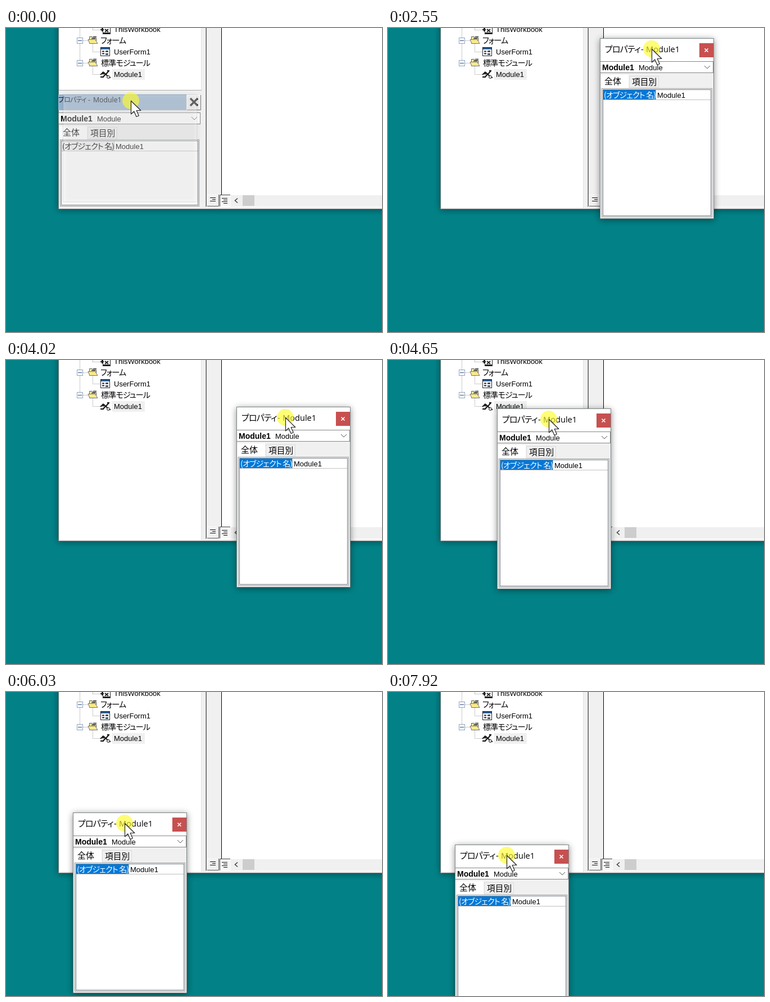
Animation of 669x540 px, one loop 8 s. Source, as an HTML page:

```html
<!DOCTYPE html>
<html lang="ja">
<head>
<meta charset="utf-8">
<style>
html, body { margin: 0; width: 100%; height: 100%; overflow: hidden; background: #028287; }
svg { display: block; width: 669px; height: 540px; }
rect, line { shape-rendering: crispEdges; }
text { font: 13px "Liberation Sans", sans-serif; white-space: pre; }
.b { font-weight: bold; font-size: 14px; }
.j { font: 14px "Noto Sans CJK JP", "Noto Sans CJK", sans-serif; font-feature-settings: "palt"; letter-spacing: -.8px; }
.k { font: 15px "Noto Sans CJK JP", "Noto Sans CJK", sans-serif; }
.s { font: 12.3px "Open Sans", sans-serif; }
.t { font: 14.6px "Open Sans", sans-serif; }
.shade { filter: drop-shadow(0 2px 6px rgba(0,0,0,.45)); }
#ghost { filter: drop-shadow(0 1px 4px rgba(0,0,0,.3)); }
</style>
</head>
<body>
<svg id="stage" viewBox="0 0 669 540"></svg>
<script>
const rect = (x, y, w, h, fill, stroke) => stroke
  ? `<rect x="${x + .5}" y="${y + .5}" width="${w - 1}" height="${h - 1}" fill="${fill}" stroke="${stroke}"/>`
  : `<rect x="${x}" y="${y}" width="${w}" height="${h}" fill="${fill}"/>`;
const path = (d, stroke, width = 1, fill = 'none', extra = '') =>
  `<path d="${d}" fill="${fill}" stroke="${stroke}" stroke-width="${width}" ${extra}/>`;
const text = (x, y, s, cls = '', fill = '#000', extra = '') =>
  `<text x="${x}" y="${y}" class="${cls}" fill="${fill}" ${extra}>${s}</text>`;
const group = (id, content, extra = '') => `<g id="${id}" ${extra}>${content}</g>`;

// Combo box, tabs and property list, shared by the docked and the floating panel
function panelBody(w, listHeight, selected) {
  const cx = w - 12;
  return rect(0, 41, w - 1, 21, '#fff', '#868686')
    + text(4, 57, 'Module1', 'b') + text(69, 57, 'Module')
    + path(`M${cx - 5} 49l5 5 5-5`, '#555')
    + rect(1, 65, 50, 24, '#fff') + rect(52, 67, 53, 21, '#f0f0f0', '#dcdcdc')
    + text(8, 82, '全体', 'k') + text(57, 83, '項目別', 'k', '#000', 'style="font-size:14.7px"')
    + rect(3, 89, w - 6, listHeight, '#fff', '#9a9a9a')
    + rect(5, 91, w - 10, listHeight - 4, '#fff', '#777f88')
    + rect(6, 92, 93, 17, selected ? '#0078d7' : '#f0f0f0')
    + text(7, 106, '(オブジェクト 名)', 'j', selected ? '#fff' : '#000')
    + text(102, 106, 'Module1')
    + rect(6, 109, w - 12, 1, '#c0c0c0') + rect(99, 92, 1, 17, '#c0c0c0');
}

const folder = y => path(`M148.500 ${y + 3.5}v-2h5l1 2h6v10h-12z`, '#555', 1, '#fff3a0')
  + path(`M146 ${y + 6.5}h13l4 7h-14z`, '#777', 1, '#fbe98a')
  + path(`M152 ${y + 4.5}h7M155 ${y + 1.5}h6`, '#333', 1.5);

const expander = y => rect(126, y, 11, 11, '#fff', '#93a6bd') + rect(128, y + 5, 7, 1, '#2a4f8f');

const tree = path('M131.5 0V62M137 22.5h9M137 62.5h9M154.5 0V3M154.5 28V42.5M154 3.5h14M154 42.5h14M154.5 68V82.5M154 82.5h14',
    '#999', 1, 'none', 'stroke-dasharray="1 1"')
  + expander(17) + expander(57) + folder(14) + folder(54)
  + rect(172, -6, 14, 16, '#fff', '#222') + rect(172, 8, 14, 3, '#222')
  + path('M168 3h6M171 0v6M176 2l6 5m0-5l-6 5', '#222', 2)
  + rect(168, 34, 17, 16, '#fff', '#223') + rect(169, 35, 15, 3, '#2c5a8c')
  + path('M171 41.5h4M171 45.5h4', '#223', 2) + rect(177, 40, 5, 3, '#456') + rect(177, 45, 5, 3, '#456')
  + path('M168 83l5-4 5 3 5-6M172 88l5-6 6 5M168 87h4M180 76h4M181 88h5', '#111', 2)
  + '<circle cx="173" cy="80" r="2.5" fill="#222"/><circle cx="182" cy="87" r="2.5" fill="#ddd" stroke="#222"/>'
  + rect(189, 73, 58, 19, '#f0f0f0')
  + text(192, 7, 'ThisWorkbook') + text(168, 27, 'フォーム', 'j', '#000', 'style="letter-spacing:-1px"')
  + text(192, 47, 'UserForm1') + text(169, 67, '標準モジュール', 'j') + text(192, 87, 'Module1');

const editor = rect(347, 0, 1, 320, '#e2e2e2')
  + rect(355, 0, 1, 318, '#a0a0a0') + rect(356, 0, 1, 318, '#606060')
  + rect(384, 0, 285, 297, '#fff') + rect(383, 0, 1, 297, '#000')
  + rect(358, 296, 21, 21, '#f0f0f0') + path('M378.5 296v20.5H358', '#555')
  + path('M358.5 316V296.5H378', '#fff')
  + path('M363 301.5h10M367 304.5h6M363 307.5h10', '#111')
  + rect(380, 296, 19, 21, '#f4f4f4') + path('M380.5 317V296.5H399', '#444') + path('M399 297v19.5H381', '#fff')
  + path('M384 302.5h10M387 305.5h7M384 308.5h10M387 311.5h7', '#111')
  + path('M412 302.5l-4.5 4 4.5 4', '#444', 1.6)
  + rect(421, 297, 21, 19, '#cdcdcd')
  + rect(356, 317, 313, 1, '#fff');

const docked = rect(94, 110, 254, 210, '#f0f0f0') + rect(94, 110, 254, 1, '#aaa')
  + rect(93, 118, 254, 28, '#99b4d1')
  + text(93, 132, 'プロパティ', 'j', '#111', 'style="font-size:12px"')
  + text(146, 132, '-', 's', '#111') + text(155, 132, 'Module1', 's', '#111')
  + rect(321, 118, 26, 28, '#f0f0f0') + path('M346.5 119v26.5H322', '#777') + path('M322.5 145V119.5H346', '#fff')
  + path('M328 125l13 13m0-13l-13 13', '#222', 3.4)
  + `<g transform="translate(93 109)">${panelBody(254, 119, false)}</g>`;

const floating = '<g class="shade">' + rect(0, 0, 203, 321, '#f0f0f0') + '</g>'
  + rect(0, 0, 203, 321, '#f0f0f0', '#7d8587') + rect(1, 1, 201, 40, '#fff')
  + text(9, 25, 'プロパティ', 'j', '#000', 'style="font-size:15px"')
  + text(73, 25, '-', 't') + text(82, 25, 'Module1', 't')
  + rect(177, 9, 25, 25, '#c75050') + path('M186.500 18.500l6 6m0-6l-6 6', '#fff', 1.6)
  + panelBody(203, 229, true);

const stage = document.getElementById('stage');
stage.innerHTML = rect(0, 0, 669, 540, '#028287')
  + '<g class="shade">' + rect(93, -20, 600, 341, '#f0f0f0') + '</g>'
  + rect(93, -1, 600, 323, '#f0f0f0', '#6f7a7b') + rect(95, 0, 252, 319, '#fff')
  + tree + editor
  + group('dock', docked)
  + '<rect id="ghost" fill="#fff" stroke="#777"/>'
  + group('win', floating)
  + '<circle id="press" r="15" fill="#fffa28" fill-opacity=".64"/>'
  + group('cursor', path('M0 0V23.500L5.300 18.500L9.500 28L13.800 26.200L9.700 17H17.300Z', '#222', 1.2, '#fff', 'stroke-linejoin="round"'));

const [dock, ghost, win, press, cursor] =
  ['dock', 'ghost', 'win', 'press', 'cursor'].map(id => document.getElementById(id));

// time, pointer x, pointer y, grip distance from the window's left edge
const track = [
  [0, 222, 129], [60, 222, 129], [230, 238, 172], [400, 290, 205], [540, 365, 165],
  [690, 436, 75], [840, 427, 50], [920, 425, 48], [2000, 425, 48], [2250, 417, 50],
  [2380, 417, 50], [2545, 468, 37], [2780, 514, 45], [3000, 520, 96], [3165, 511, 99],
  [3940, 511, 99], [4010, 498, 100, 87], [4150, 460, 165], [4300, 400, 215],
  [4450, 335, 180], [4560, 300, 125], [4630, 286, 105], [4785, 266, 103],
  [5000, 261, 110], [5300, 230, 150], [5635, 211, 183], [6020, 211, 233],
  [7220, 211, 233], [7870, 211, 290], [8000, 211, 290]
];

function pointerAt(t) {
  const i = Math.max(1, track.findIndex(k => k[0] > t));
  const [a, b] = [track[i - 1], track[i]];
  const f = (t - a[0]) / (b[0] - a[0]);
  const mix = (p, q) => p + (q - p) * f;
  return [mix(a[1], b[1]), mix(a[2], b[2]), mix(a[3] || 92, b[3] || 92)].map(Math.round);
}

const show = (el, on) => el.setAttribute('display', on ? 'inline' : 'none');
const move = (el, x, y) => el.setAttribute('transform', `translate(${x} ${y})`);
const within = (t, spans) => spans.some(([a, b]) => t >= a && t < b);
const STEP = 77.2;

function placeGhost(t, x, y) {
  const grow = Math.min(1, t / 200);
  const small = t < 250;
  const [w, h, dx, dy] = small ? [254, 203, 129, 17] : [203, 321, 100, 17];
  const s = .94 + .06 * grow;
  const left = x - dx + w * (1 - s) / 2, top = y - dy + h * (1 - s) / 2;
  const box = { x: Math.round(left) + .5, y: Math.round(top) + .5, width: Math.round(w * s) - 1, height: Math.round(h * s) - 1,
    'fill-opacity': .3 + .52 * grow, 'stroke-opacity': .15 + .75 * grow };
  for (const key in box) ghost.setAttribute(key, box[key]);
}

function draw() {
  const t = performance.now() % 8000;
  const q = Math.floor((t + 8) / STEP) * STEP;
  const [x, y, grip] = pointerAt(q);
  const floats = t >= 1620;
  show(dock, !floats);
  show(ghost, !floats);
  show(win, floats);
  if (!floats) placeGhost(q, x, y);
  // The window stays where it was dropped until it is gripped again
  if (t < 2410) move(win, 325, 31);
  else move(win, x - grip, y - 19);
  show(press, within(t, [[0, 1620], [2410, 3400], [3790, 6500], [7140, 8000]]));
  move(press, x, y);
  move(cursor, x + .5, y + .5);
  requestAnimationFrame(draw);
}
draw();
</script>
</body>
</html>
```
